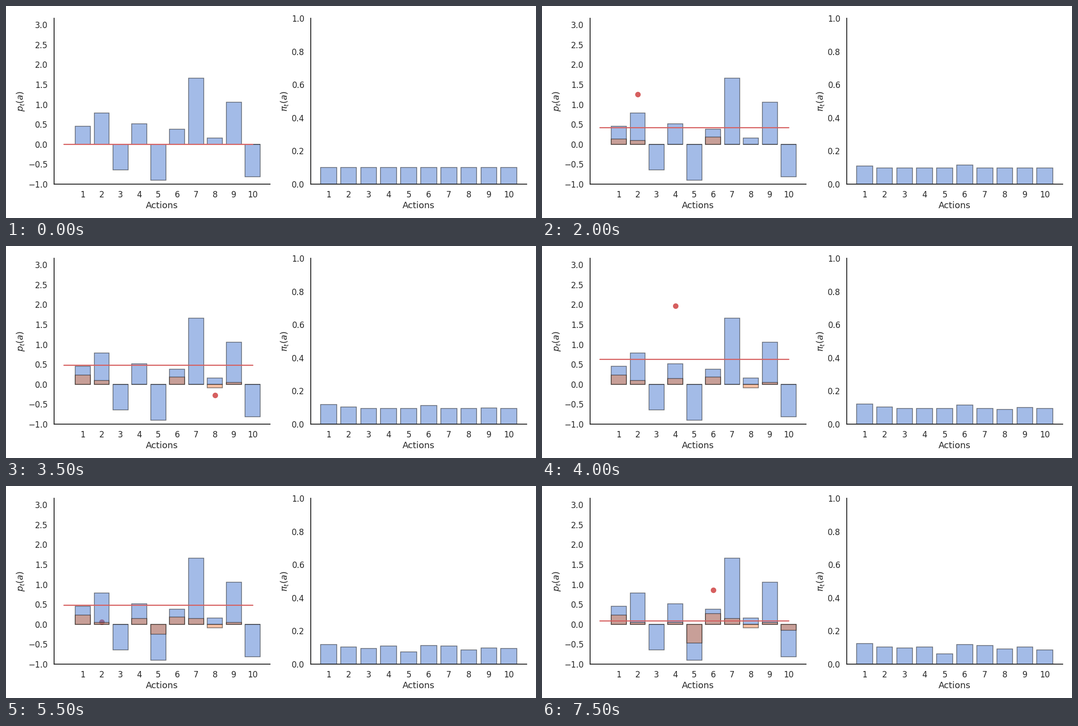
These frames come from a looping animation (1080 by 432 pixels, 8 s). A matplotlib script:

```python
import numpy as np
import matplotlib.pyplot as plt
from matplotlib.animation import FuncAnimation

BLUE, ORANGE, RED, INK = "#4878d0", "#ee854a", "#d65f5f", "0.15"
WIDTH, HEIGHT, DPI = 1080, 432, 72
RATE = 0.1
FLOOR = -1.0

plt.rcParams.update({
    "font.family": "DejaVu Sans", "font.size": 18,
    "axes.labelsize": 18, "xtick.labelsize": 16.5, "ytick.labelsize": 16.5,
    "axes.edgecolor": INK, "axes.labelcolor": INK, "text.color": INK,
    "xtick.color": INK, "ytick.color": INK, "axes.linewidth": 1.875,
    "xtick.major.size": 9, "ytick.major.size": 9,
    "xtick.bottom": False, "ytick.left": False,
    "axes.spines.top": False, "axes.spines.right": False,
    "lines.solid_capstyle": "round",
})

ACTIONS = np.arange(1, 11)
VALUES = [0.45, 0.79, -0.64, 0.52, -0.9, 0.38, 1.66, 0.16, 1.06, -0.81]

# One pull per step: (action, luck); the reward is the action's value plus luck
PULLS = [(6, 0.67), (6, 0.54), (1, 1.09), (2, 0.46), (1, 0.96),
         (9, -0.08), (8, -0.43), (4, 1.45), (7, 0.43), (5, -0.82),
         (2, -0.73), (5, -0.88), (10, -0.39), (4, -1.48), (6, 0.48)]


def softmax(x):
    e = np.exp(x)
    return e / e.sum()


def run_bandit():
    """Yield (preferences, policy, baseline, dot) for every step."""
    prefs, baseline = np.zeros(10), 0.0
    yield prefs.copy(), softmax(prefs), baseline, None
    for action, luck in PULLS:
        policy = softmax(prefs)
        reward = VALUES[action - 1] + luck
        step = RATE * (reward - baseline)
        prefs[action - 1] += step
        baseline += step
        yield prefs.copy(), policy, baseline, (action, max(reward, FLOOR))


def draw_bars(ax, heights, color):
    return ax.bar(ACTIONS, heights, 0.8, color=color, edgecolor="black",
                  linewidth=1.5, alpha=0.5)


def set_heights(bars, heights):
    for bar, h in zip(bars, heights):
        bar.set_height(h)


states = list(run_bandit())
fig, (left, right) = plt.subplots(
    1, 2, figsize=(WIDTH / DPI, HEIGHT / DPI), dpi=DPI)
fig.subplots_adjust(left=98 / WIDTH, right=1061 / WIDTH, wspace=83 / 440,
                    bottom=69 / HEIGHT, top=407 / HEIGHT)

dots = left.scatter([], [], s=81, color=RED, linewidths=2.25)
draw_bars(left, VALUES, BLUE)
pref_bars = draw_bars(left, np.zeros(10), ORANGE)
base_line, = left.plot([0, 10], [0, 0], color=RED, lw=2.25)
policy_bars = draw_bars(right, np.full(10, 0.1), BLUE)

left.set(xlim=(-0.52, 10.92), ylim=(FLOOR, 3.16), xticks=ACTIONS,
         yticks=np.arange(-1, 3.1, 0.5), xlabel="Actions", ylabel="$p_t(a)$")
right.set(xlim=(0.11, 10.89), ylim=(0, 1), xticks=ACTIONS,
          yticks=np.linspace(0, 1, 6), xlabel="Actions", ylabel=r"$\pi_t(a)$")


def update(step):
    prefs, policy, baseline, dot = states[step]
    set_heights(pref_bars, prefs)
    set_heights(policy_bars, policy)
    base_line.set_ydata([baseline, baseline])
    dots.set_offsets([dot] if dot else np.empty((0, 2)))
    return [*pref_bars, *policy_bars, base_line, dots]


anim = FuncAnimation(fig, update, frames=len(states), interval=500,
                     repeat=True, repeat_delay=0)
plt.show()
```
